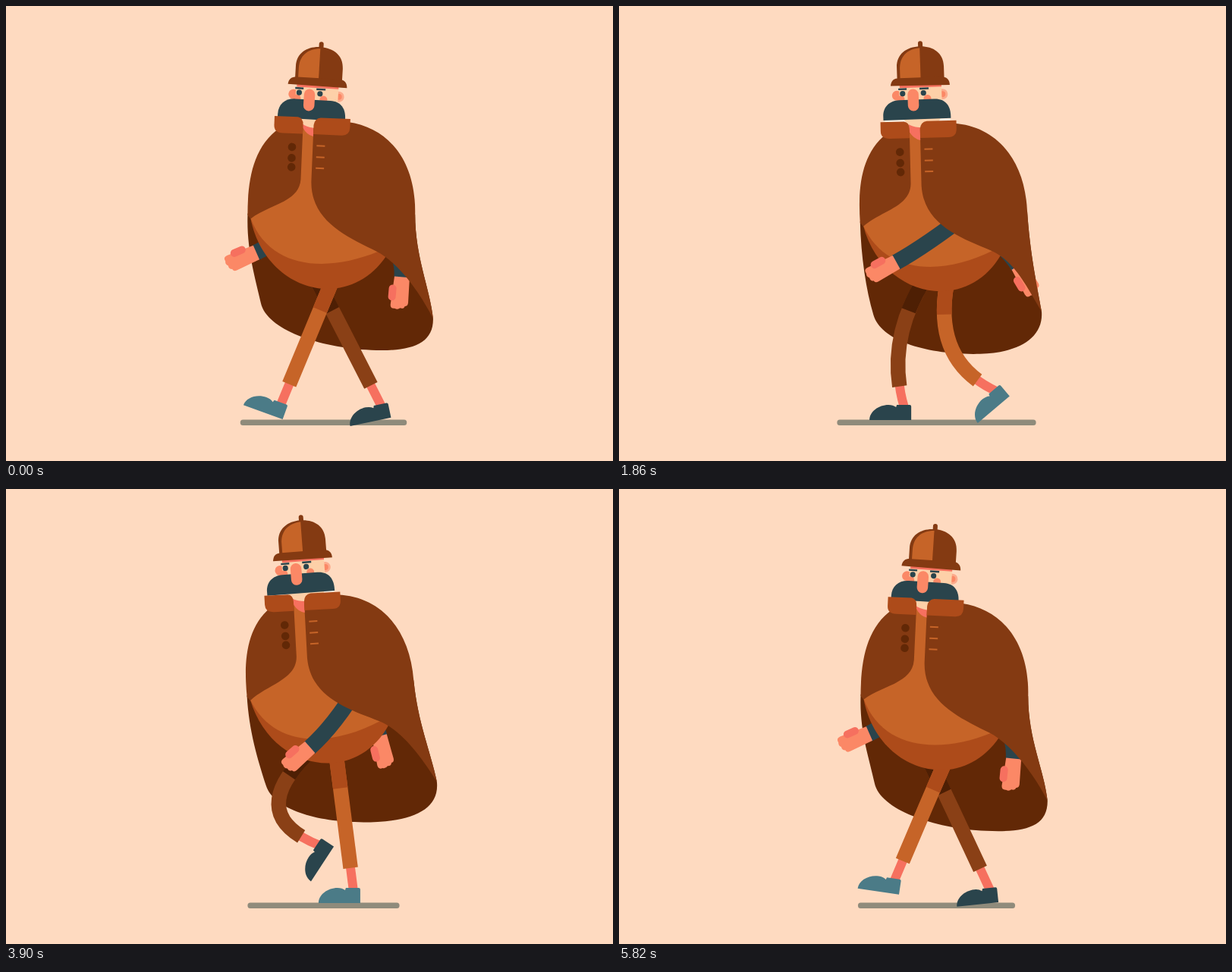
These frames come from a looping animation (800x600 px, 5850 ms). An HTML page:

```html
<!DOCTYPE html>
<html lang="en">
<head>
<meta charset="utf-8">
<title>Walking detective</title>
<style>
  html, body { margin: 0; width: 100%; height: 100%; overflow: hidden; background: #fedac0; }
  svg { display: block; width: 100vw; height: 100vh; }
  .rust { fill: #843a12; }
  .tan { fill: #c66428; }
  .brick { fill: #ad4b1a; }
  .deep { fill: #622806; }
  .ink { fill: #2a444c; }
  .skin { fill: #fdd0a8; }
  .palm { fill: #fb8866; }
  .pink { fill: #f6705f; }
  .line { fill: none; }
  .sleeve { stroke: #2a444c; stroke-width: 21; }
  .ankle { stroke: #f6705f; stroke-width: 12; }
  .pants, .shade { stroke-width: 19.5; }
  .pants { stroke-dasharray: 84 200; }
  .shade { stroke-dasharray: 28 200; }
  #near .pants { stroke: #c66428; }
  #near .shade { stroke: #ad4b1a; }
  #near .shoe { fill: #4b7b87; }
  #far .pants { stroke: #8a4016; }
  #far .shade { stroke: #4e1f04; }
  #far .shoe { fill: #2a444c; }
</style>
</head>
<body>
<svg viewBox="0 0 800 600" preserveAspectRatio="xMidYMid meet">
  <defs>
    <g id="hand">
      <path class="palm" d="M-10 -1H10L11 32Q11 37 7 37Q6 41 1 40Q-2 43 -6 41Q-12 42 -12 36Z"/>
      <rect class="pink" x="-16" y="10" width="10" height="21" rx="5"/>
    </g>
    <path id="shoe" d="M-10 0H7Q9 0 9 2V20H-46C-46 9 -34 0 -21 0Q-15 0 -11 3Z"/>
  </defs>

  <rect id="ground" y="545.5" height="7.5" rx="3.5" fill="#8f8b7b"/>
  <g class="body"><path id="lining" class="deep"/></g>

  <g id="farArm"><path class="line sleeve"/><use href="#hand"/></g>

  <g id="far">
    <path class="line ankle"/>
    <path class="line pants" pathLength="100"/>
    <path class="line shade" pathLength="100"/>
    <use class="shoe" href="#shoe"/>
  </g>
  <g id="near">
    <path class="line ankle"/>
    <path class="line pants" pathLength="100"/>
    <path class="line shade" pathLength="100"/>
    <use class="shoe" href="#shoe"/>
  </g>

  <g class="body">
    <path class="brick" d="M322 289C345 385 455 410 503 331L440 260H360Z"/>
    <path class="tan" d="M322 289C350 355 425 357 492 326L430 255L408 160H378V250Z"/>
  </g>

  <g id="nearArm"><path class="line sleeve"/><use href="#hand"/></g>

  <g class="body">
    <path class="rust" d="M386 165V235C385 266 345 270 322 290L318 285C316 240 321 195 355 169Z"/>
    <path id="cape" class="rust"/>
    <g class="deep">
      <circle cx="372.7" cy="193" r="5.3"/>
      <circle cx="372.8" cy="207.5" r="5.3"/>
      <circle cx="373" cy="219.5" r="5.3"/>
    </g>
    <path class="line" stroke="#c66428" stroke-width="2" d="M405 190h11M405 205h11M405 219.5h11"/>
    <path class="pink" d="M384 150H400V178Q391 176 386 167Z"/>

    <g id="head">
      <path fill="#fdeee0" d="M354 147H440V154H354Z"/>
      <circle class="palm" cx="371" cy="117" r="6.5"/>
      <circle fill="#fcab8c" cx="431" cy="117" r="7"/>
      <circle class="palm" cx="431" cy="117" r="4"/>
      <path class="skin" d="M374 100H430V135Q430 160 405 160Q384 160 379 148L374 130Z"/>
      <path class="pink" d="M375 103H430V107H375Z"/>
      <circle class="palm" cx="376" cy="122" r="5"/>
      <circle class="palm" cx="411" cy="122" r="5"/>
      <g class="ink">
        <circle cx="378.5" cy="114.5" r="3.6"/>
        <circle cx="406" cy="114.5" r="3.6"/>
        <rect x="373" y="107.5" width="11" height="2.4"/>
        <rect x="401" y="107.5" width="12" height="2.4"/>
        <path d="M352 149V144C352 131 361 123 374 123H420C434 123 442 132 441 149Z"/>
      </g>
      <rect class="palm" x="385" y="109" width="14.5" height="29" rx="7.2"/>
      <rect class="rust" x="401" y="46" width="6" height="12" rx="3"/>
      <path class="rust" d="M372 97V80C372 62 386 53 403 53S434 62 434 80V97Z"/>
      <path class="tan" d="M376 95V82C376 66 386 56 403 55V95Z"/>
      <path class="rust" d="M363 104C364 96 368 94 375 94H430C437 94 441 98 441 105Z"/>
    </g>

    <g class="brick">
      <path d="M348 153H379Q386 154 386 163V175H360Q348 175 348 165Z"/>
      <path d="M400 175V163Q401 154 409 153H448V164Q448 175 437 175Z"/>
    </g>
  </g>
</svg>

<script>
const CYCLE = 1170, STEP = CYCLE / 2, FRAME = 30;
const LEG = 178;

const { sin, cos, sqrt, hypot, max, floor, PI } = Math;
const rad = deg => deg * PI / 180;
const $ = s => document.querySelector(s);
const set = (el, name, value) => el.setAttribute(name, value);
const place = (el, x, y, angle) => set(el, 'transform', `translate(${x} ${y}) rotate(${angle})`);
const bodies = document.querySelectorAll('.body');

// Smooth 0 to 1 between times a and b
function ease(t, a, b) {
  const u = Math.min(1, max(0, (t - a) / (b - a)));
  return u * u * (3 - 2 * u);
}

// Cosine wave that peaks at the given time
const wave = (t, peak, period) => cos(2 * PI * (t - peak) / period);

// Planted and carried back, rolled over the toe, kicked up, swung forward
function foot(time) {
  const t = 60 + ((time - 60) % CYCLE + CYCLE) % CYCLE;
  return {
    x: 363 + 115 * ease(t, 45, 515) + 17 * ease(t, 520, 650) - 132 * ease(t, 790, 1080),
    y: 526 - 58 * (ease(t, 560, 880) - ease(t, 1010, 1195)),
    angle: -20 * ease(t, 500, 650) - 78 * ease(t, 650, 770) + 98 * ease(t, 850, 1130)
      + 20 * (ease(t, 1120, 1165) - ease(t, 1175, 1230))
  };
}

// The leg is a hose of fixed length that bulges forward as the foot nears the hip
function drawLeg(id, time, hipX, hipY, shift) {
  const { x, y, angle } = foot(time);
  const fx = x + shift, r = rad(angle);
  const ex = fx - 4 * sin(r), ey = y + 4 * cos(r);
  const d = hypot(fx - hipX, y - hipY);
  const ux = (fx - hipX) / d, uy = (y - hipY) / d;
  const sag = sqrt(max(0, LEG - d) * d * 3 / 8);
  const kx = (hipX + fx) / 2 + sag * (0.4 * ux - 2 * uy);
  const ky = (hipY + y) / 2 + sag * (0.4 * uy + 2 * ux);
  const leg = $(id);
  leg.querySelectorAll('path').forEach(p => set(p, 'd', `M${hipX} ${hipY}Q${kx} ${ky} ${ex} ${ey}`));
  place(leg.querySelector('.shoe'), fx, y, angle);
}

function drawArm(id, shoulderX, shoulderY, x, y, angle) {
  const r = rad(angle);
  const ex = x + 45 * sin(r), ey = y - 45 * cos(r);
  set($(id + ' path'), 'd', `M${shoulderX} ${shoulderY}Q${ex} ${ey} ${x} ${y}`);
  place($(id + ' use'), x, y, angle);
}

function drawArms(time, lift) {
  const c = wave(time, 10, CYCLE);
  drawArm('#nearArm', 469, 268 + lift,
    438 + 84 * c, 368 + lift + 15.5 * c - 19.5 * c * c, 35 - 30 * c);
  const s = ease(-c, -1, 1);
  drawArm('#farArm', 405, 245 + lift, 329 + 200 * s, 331 + lift + 14 * s, 66 - 98 * s);
}

function drawCape(k) {
  const rx = 546 + 25 * k, ry = 406 + 6 * k;
  const bx = 462 + 30 * k, by = 465 - 10 * k;
  const lx = 328 + 14 * k, ly = 411 - 12 * k;
  const side = `${rx} ${ry}C${rx - 6} ${ry - 40} 541 332 538.5 275`;
  set($('#lining'), 'd', `M318 283C318 330 ${lx - 9} ${ly - 34} ${lx} ${ly}`
    + `C${lx + 9} ${ly + 34} ${bx - 70} ${by} ${bx} ${by}`
    + `C${bx + 50} ${by} ${rx + 2} ${ry + 35} ${side}Z`);
  set($('#cape'), 'd', `M400 165V238C402 290 450 308 490 326`
    + `C520 340 ${rx - 18} ${ry - 32} ${side}C537 205 499 162 445 157Z`);
}

function draw(time) {
  const p = 2 * PI * time / STEP;
  const lift = -7.2 + 8.2 * sin(p) + 1.6 * cos(2 * p) - 0.7 * sin(2 * p);
  const drop = 3.2 + 4.6 * wave(time, 520, STEP) - 0.9 * sin(2 * p);
  const half = 115 + 21 * wave(time, 170, STEP);
  const lean = -0.2 + 3.2 * wave(time, 1055, CYCLE);

  bodies.forEach(b => set(b, 'transform', `translate(0 ${lift}) rotate(${lean} 410 294)`));
  set($('#head'), 'transform', `translate(0 ${drop}) rotate(${lean * 0.4} 398 150)`);
  set($('#ground'), 'x', 418.5 - half);
  set($('#ground'), 'width', 2 * half);
  drawCape(0.5 + 0.53 * wave(time, 513, STEP));
  drawLeg('#near', time, 434, 358 + lift, 0);
  drawLeg('#far', time + STEP, 405, 358 + lift, 8);
  drawArms(time, lift);
}

let start;
function tick(now) {
  start ??= now;
  draw(floor((now - start) / FRAME) * FRAME);
  requestAnimationFrame(tick);
}
draw(0);
requestAnimationFrame(tick);
</script>
</body>
</html>
```
